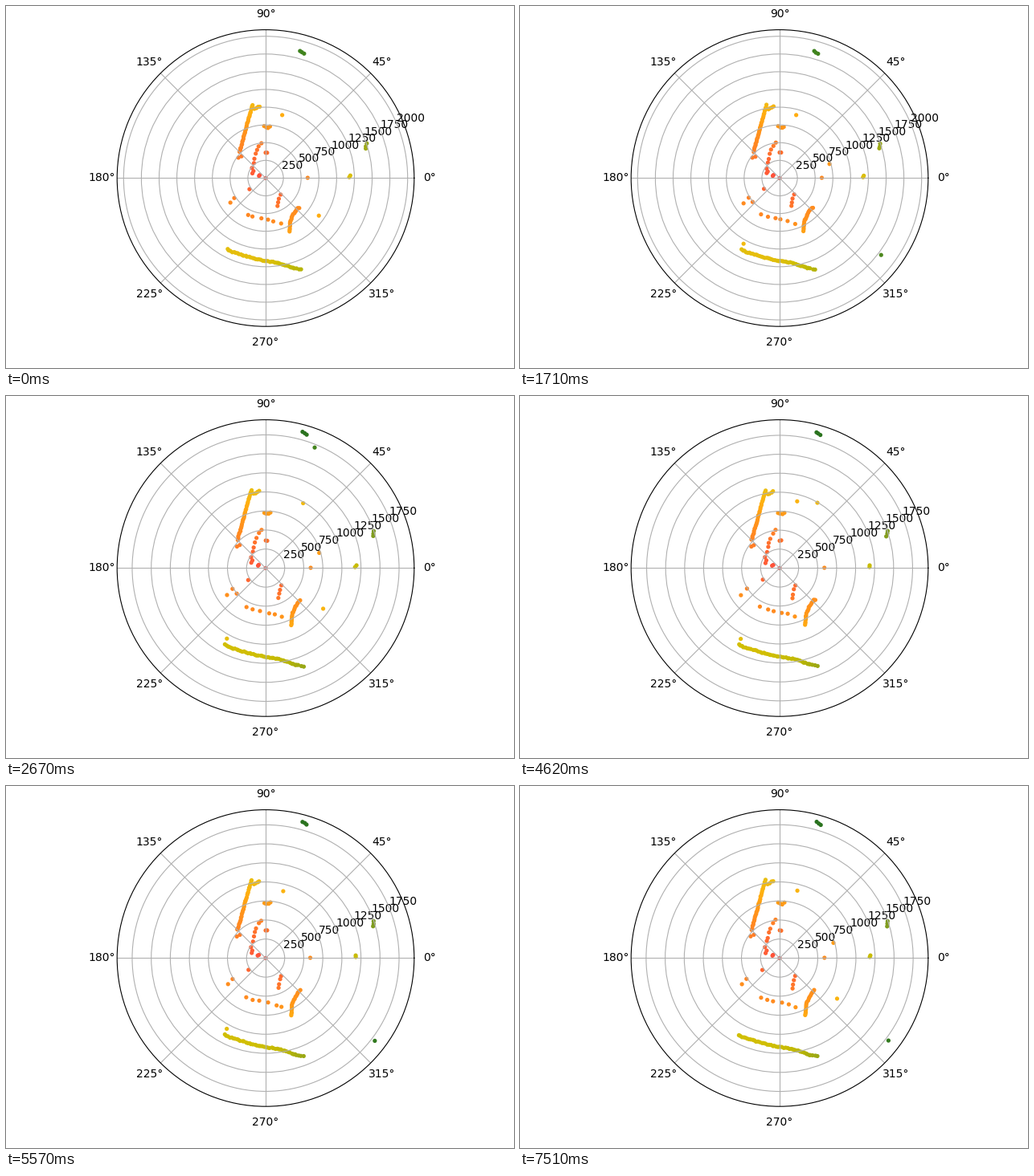
Write a matplotlib script that moves like this. It is 632 by 451 pixels and loops after 8 s.

```python
import matplotlib.pyplot as plt
import numpy as np
from matplotlib.animation import FuncAnimation
from matplotlib.colors import LinearSegmentedColormap

W, H, DPI = 632, 451, 100
CX, CY, R = 323, 214.4, 184.8      # dial centre and radius in pixels
STEP, LOOP = 40, 8000
NOISE = 6                          # ranging error in mm

STARTS = [0, 830, 1710, 2670, 3650, 4620, 5570, 6540, 7510]
WIDE, NEAR = 2092, 1948            # outer range in mm
RANGES = [WIDE, NEAR, WIDE, NEAR, NEAR, NEAR + 7, NEAR, NEAR, NEAR - 1]

# Surfaces hit in every sweep: dot count, then corners in mm
SURFACES = [
    (1, [(0, 0)]),
    # long walls
    (40, [(-536, -1005), (-484, -1037), (-210, -1121), (-32, -1163),
          (179, -1195), (389, -1268)]),
    (30, [(-184, 1030), (-252, 793), (-336, 477), (-368, 372)]),
    (17, [(452, -416), (389, -511), (347, -610), (337, -753)]),
    # wall ends
    (4, [(400, -1270), (463, -1285), (500, -1290)]),
    (4, [(-158, 973), (-84, 1010)]),
    (2, [(-379, 285), (-337, 305)]),
    # rows of small objects
    (6, [(-53, 499), (-105, 436), (-137, 351), (-168, 215)]),
    (3, [(-189, 141), (-168, 88), (-189, 67)]),
    (6, [(-260, -508), (-168, -545), (74, -595), (220, -645)]),
    (4, [(210, -231), (179, -300), (168, -395)]),
    (4, [(-21, 730), (32, 708), (63, 730)]),
    (2, [(0, 358), (21, 362)]),
    (2, [(-85, 42), (-100, 32)]),
    (1, [(-225, -155)]),
    (2, [(-431, -271), (-505, -354)]),
    # distant objects
    (3, [(484, 1790), (540, 1750)]),
    (3, [(1421, 489), (1405, 415)]),
    (2, [(1187, 36), (1178, 12)]),
    (1, [(589, 4)]),
]

# Weak targets that only some sweeps pick up
FAINT = [(705, 200), (494, 856), (232, 884), (-510, -930), (1430, -1085),
         (642, 1580), (750, -530), (470, -420), (-379, -335)]

# Colour by share of the outer range
CMAP = LinearSegmentedColormap.from_list("range", [
    (0, "#ff483e"), (0.15, "#ff6830"), (0.26, "#ff8424"), (0.36, "#ff9818"),
    (0.45, "#ffb010"), (0.53, "#ecbe10"), (0.59, "#cebe02"),
    (0.66, "#b6b406"), (0.74, "#8aa01e"), (0.9, "#38801e"), (1, "#1c6420")])


def sample(count, corners, rng):
    """Spread dots along a polyline with slightly uneven gaps."""
    x, y = np.array(corners, float).T
    length = np.r_[0, np.cumsum(np.hypot(np.diff(x), np.diff(y)))]
    t = np.linspace(0, 1, count) + rng.uniform(-0.25, 0.25, count) / count
    t = np.clip(t, 0, 1) * length[-1]
    return np.c_[np.interp(t, length, x), np.interp(t, length, y)]


def sweep(index):
    """Return polar offsets and colours of one sweep."""
    rng = np.random.default_rng(index)
    solid = [sample(n, corners, rng) for n, corners in SURFACES]
    faint = np.array(FAINT)[rng.random(len(FAINT)) < 0.5]
    x, y = np.vstack([*solid, faint]).T
    r = np.hypot(x, y)
    r[1:] += rng.uniform(-NOISE, NOISE, len(r) - 1)
    return np.c_[np.arctan2(y, x), r], CMAP(r / RANGES[index])


SWEEPS = [sweep(i) for i in range(len(STARTS))]

fig = plt.figure(figsize=(W / DPI, H / DPI), dpi=DPI)
ax = fig.add_axes([(CX - R) / W, 1 - (CY + R) / H, 2 * R / W, 2 * R / H],
                  projection="polar")
dots = ax.scatter([], [], s=5, lw=1.5)


def update(frame):
    index = np.searchsorted(STARTS, (frame + 1) * STEP - 1, side="right") - 1
    rmax = RANGES[index]
    offsets, colors = SWEEPS[index]
    dots.set_offsets(offsets)
    dots.set_color(colors)
    ax.set_yticks(np.arange(250, rmax, 250))
    ax.set_ylim(0, rmax)
    return dots,


anim = FuncAnimation(fig, update, frames=LOOP // STEP, interval=STEP,
                     repeat=True, repeat_delay=0)
plt.show()
```
